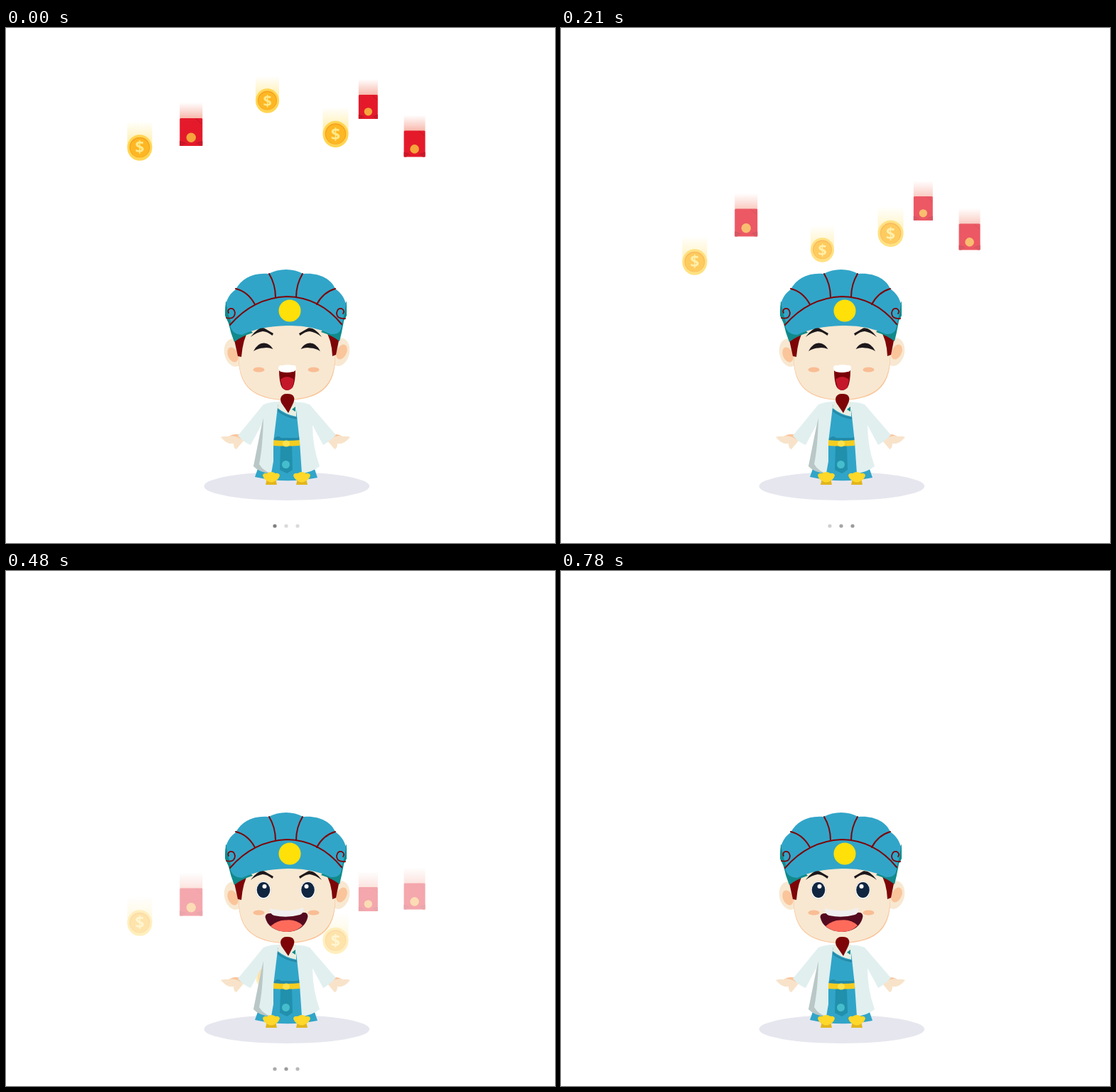
Recreate the animation shown at these times as an HTML page with a canvas. Size 772 by 725 pixels, loop 0.91 s.

```html
<!DOCTYPE html>
<html lang="en">
<head>
<meta charset="utf-8">
<title>Lucky rain</title>
<style>
html, body { margin: 0; width: 100%; height: 100%; overflow: hidden; background: #fff; }
canvas { display: block; }
</style>
</head>
<body>
<canvas id="stage" width="772" height="725"></canvas>
<script>
const ctx = document.getElementById('stage').getContext('2d');
const LOOP = 910, STEP = 30, LAST = 780, BLINK = 260;
const TIMES = [0, 60, 210, 360, 480, 660, 780];
const BLUE = '#31a5c8', TEAL = '#118a8c', WINE = '#7d0508', SKIN = '#f8e8d1',
      BLUSH = '#fac59b', COAT = '#e1efef', GOLD = '#ffd829', INK = '#1d181b';

const coins = [
  { x: 188, r: 17.5, path: [168, 218, 329, 420, 495, 600, 650] },
  { x: 367.5, r: 16.5, path: [102, 164, 312, 455, 571, 640, 645] },
  { x: 463.5, r: 18, path: [149, 190, 289, 400, 520, 633, 665] }
];
const packets = [
  { x: 260.3, w: 32, h: 39, path: [146.5, 183, 274, 375, 466, 606, 685] },
  { x: 509.3, w: 27, h: 34, path: [111, 150, 254, 370, 462, 585, 655] },
  { x: 574.5, w: 30, h: 37, path: [163, 201, 294, 385, 458, 572, 645] }
];
const dots = [
  { x: 378, grey: [128, 160, 208, 185, 170, 255, 255] },
  { x: 394, grey: [218, 186, 165, 236, 155, 255, 255] },
  { x: 410, grey: [218, 186, 155, 236, 184, 255, 255] }
];

function at(values, t) {
  let i = 1;
  while (i < TIMES.length - 1 && t > TIMES[i]) i++;
  const k = (t - TIMES[i - 1]) / (TIMES[i] - TIMES[i - 1]);
  return values[i - 1] + (values[i] - values[i - 1]) * k;
}

function fill(d, color) {
  ctx.fillStyle = color;
  ctx.fill(new Path2D(d));
}

function line(d, color, width) {
  ctx.strokeStyle = color;
  ctx.lineWidth = width;
  ctx.stroke(new Path2D(d));
}

function oval(x, y, rx, ry, color, turn = 0) {
  ctx.fillStyle = color;
  ctx.beginPath();
  ctx.ellipse(x, y, rx, ry, turn, 0, Math.PI * 2);
  ctx.fill();
}

function mirrored(axis, draw) {
  draw();
  ctx.save();
  ctx.transform(-1, 0, 0, 1, 2 * axis, 0);
  draw();
  ctx.restore();
}

function trail(x, top, width, height, rgb, strength) {
  const g = ctx.createLinearGradient(0, top, 0, top + height);
  g.addColorStop(0, `rgba(${rgb},0)`);
  g.addColorStop(1, `rgba(${rgb},${strength})`);
  ctx.fillStyle = g;
  ctx.fillRect(x - width / 2, top, width, height);
}

function drawCoin({ x, r, path }, t) {
  const y = at(path, t);
  trail(x, y - 2.1 * r, 2 * r, 2.1 * r, '255,226,110', 0.65);
  oval(x, y + 0.5, r, r + 0.8, '#ffd552');
  oval(x, y, r * 0.82, r * 0.82, '#f7a222');
  oval(x, y + 0.6, r * 0.75, r * 0.75, '#fdb724');
  ctx.fillStyle = '#ffe98a';
  ctx.font = `bold ${r * 1.3}px "Open Sans", sans-serif`;
  ctx.fillText('$', x, y + r * 0.48);
}

function drawPacket({ x, w, h, path }, t) {
  const y = at(path, t);
  trail(x, y - h / 2 - 22, w, 23, '240,110,85', 0.5);
  ctx.save();
  ctx.translate(x - w / 2, y - h / 2);
  ctx.fillStyle = '#e41a2b';
  ctx.beginPath();
  ctx.roundRect(0, 0, w, h, 1.5);
  ctx.fill();
  fill(`M0 ${h * 0.82}L${w * 0.25} ${h * 0.88}L${w * 0.12} ${h}H0Z
        M${w} ${h * 0.82}L${w * 0.75} ${h * 0.88}L${w * 0.88} ${h}H${w}Z`, '#cb1828');
  line(`M${w * 0.72} 1L${w - 1} ${h * 0.2}M1 ${h * 0.84}L${w * 0.28} ${h * 0.92}
        M${w - 1} ${h * 0.84}L${w * 0.72} ${h * 0.92}`, '#b51625', 0.8);
  oval(w / 2, h * 0.7, w * 0.21, w * 0.21, '#f6a43b');
  ctx.restore();
}

function drawBody() {
  oval(394.8, 645, 116.3, 20, '#e6e6ef');
  fill('M356 615L350 632Q394 642 438 633L431 612L408 530H380Z', BLUE);
  fill('M383 526H408V547Q393 544 382 535Z', '#e8eee2');
  fill('M381 535Q392 546 409 548V551Q392 548 381 539Z', '#2589a7');
  fill('M402 537L407 533V540Z', TEAL);
  fill('M376 579Q382 572 387 577H410L413 574V582H375Z', '#228aa8');
  fill('M386 588H402L403 622L395 627L385 622Z', '#2190ac');
  fill('M375 580Q394 582 414 580L413 588Q394 589 375 588Z', '#f5cd20');
  oval(394, 585, 5, 4.5, '#ffe14b');
  oval(393.5, 614.5, 5.5, 5.5, '#46bdcd');

  mirrored(393, () => {
    fill('M302 576Q306 574 318 575Q324 571 331 574L334 581Q329 587 324 593Q320 592 320 585Q312 586 307 581Z', '#f8e3ca');
    fill('M313 575Q323 569 332 574L330 579Q324 573 313 575Z', BLUSH);
  });
  fill('M362 530Q372 526 383 526L381 542L376 583V610L373 627Q357 625 348 617L360 557L344 587Q334 583 326 574Z', COAT);
  fill('M362 549Q361 590 356 614Q362 624 373 627Q356 626 348 617L359 562Z', '#b9c7c6');
  fill('M407 527Q417 526 427 530L464 573Q455 582 446 587L431 559Q431 589 441 617Q431 625 416 627L413 583Z', COAT);

  for (const x of [373, 416]) {
    ctx.save();
    ctx.translate(x, 0);
    fill('M-6 634H6L8 643H-8Z', '#e2b51d');
    fill('M-12 630Q-11 626 -6 627Q0 623 6 627Q11 626 12 630Q10 636 5 638Q0 641 -5 638Q-10 636 -12 630Z', GOLD);
    ctx.restore();
  }
}

function drawHead() {
  oval(321, 457, 14, 20, SKIN, -0.2);
  oval(319, 460, 7, 11, BLUSH, -0.4);
  oval(469, 456, 14, 20, SKIN, 0.2);
  oval(472, 456, 7, 11, BLUSH, 0.45);
  fill('M328 415L327 467C328 502 345 524 396 524C445 523 462 502 463 467L462 415Z', BLUSH);
  fill('M328 415L327.5 465C328 500 345 523 396 523C445 521 461 500 462.5 465L462 415Z', SKIN);
  fill('M319 430L342 424Q333 438 331 463L326 462ZM470 430L448 424Q458 438 459 462L464 460Z', WINE);

  fill('M309 385Q311 418 321 442Q331 434 347 429L320 400ZM479 385Q475 418 469 441Q459 433 443 428L468 400Z', TEAL);
  fill('M308 404C307 387 312 376 323 368C331 353 347 344 369 346C384 338 404 338 418 346C440 344 457 353 463 367C475 376 481 387 478 407L472 417Q472 432 457 431Q430 418 395 419Q357 420 332 432Q316 431 315 416Z', BLUE);
  fill('M308 405L309 384Q312 403 317 416L315 420ZM479 405V384Q476 404 472 417Z', TEAL);
  line('M315 418Q348 380 395 378Q441 379 472 417', WINE, 2);
  line('M370 346Q379 361 379 379M417 346Q408 361 408 379M323 367Q340 371 350 389M463 367Q446 372 437 389', WINE, 2);
  line('M310 408Q321 411 322 401Q321 394 315 395Q311 397 313 401M477 409Q465 410 465 401Q466 394 472 395Q477 398 474 402', WINE, 1.8);
  oval(399, 398, 15.5, 15.5, '#ffe009');

  mirrored(394, () => {
    fill('M344 435Q354 421 363 422.5L376 430L374.5 433Q367 427 361 427Q353 428 344 435Z', INK);
    oval(355.5, 481, 8, 3.6, '#f9bd94');
  });
  fill('M396 515C386 514 384 523 388 529L397 542L403 530C408 521 405 515 396 515Z', WINE);
}

function drawLaugh() {
  mirrored(395, () =>
    fill('M348 455Q354 443 363 443.5Q371 444 375.5 452Q368 449 362 450.5Q355 450.5 348 455Z', INK));
  fill('M384 481H407Q407 499 403 506Q395 514 388 506Q384 499 384 481Z', '#790008');
  fill('M386 495Q395 487 405 495Q404 503 402 507Q395 513 389 507Z', '#c41729');
  fill('M383 478Q384 474 389 475Q396 473 403 475Q408 474 408 479Q407 484 403 484Q395 486 387 484Q383 483 383 478Z', '#fff');
}

function drawSmile() {
  for (const [x, shine] of [[362, 363.5], [424.5, 422.5]]) {
    oval(x, 449.5, 10.8, 13, '#d9d2c5');
    oval(x, 449.5, 10.3, 12.5, '#fff');
    oval(x, 449, 9.3, 11, '#10253f');
    oval(shine, 444, 3, 3, '#fff');
  }
  fill('M364.5 487Q365 482 371 482L417 481Q424 480 424.5 486C422 501 409 508 394 508C378 507 367 500 364.5 487Z', '#550b1f');
  fill('M372 500Q382 491 394 491.5Q408 490 417 499Q409 508 394 508Q380 507 372 500Z', '#ff6b5b');
  fill('M371 475Q395 482 418 474Q419 482 413 484Q395 489 377 485Q371 483 371 475Z', '#f0f0f0');
}

function draw(t) {
  ctx.globalAlpha = 1;
  ctx.fillStyle = '#fff';
  ctx.fillRect(0, 0, 772, 725);
  coins.forEach(c => drawCoin(c, t));
  packets.forEach(p => drawPacket(p, t));

  // Fade the falling items toward the white backdrop.
  ctx.globalAlpha = t / LAST;
  ctx.fillStyle = '#fff';
  ctx.fillRect(0, 0, 772, 725);
  ctx.globalAlpha = 1;

  for (const { x, grey } of dots) {
    const v = Math.round(at(grey, t));
    oval(x, 701, 2.6, 2.6, `rgb(${v},${v},${v})`);
  }
  drawBody();
  drawHead();
  if (Math.floor(t / BLINK) % 2) drawSmile();
  else drawLaugh();
}

function tick() {
  const t = performance.now() % LOOP;
  draw(Math.min(LAST, Math.floor(t / STEP) * STEP));
  requestAnimationFrame(tick);
}

ctx.textAlign = 'center';
ctx.lineCap = 'round';
tick();
</script>
</body>
</html>
```
